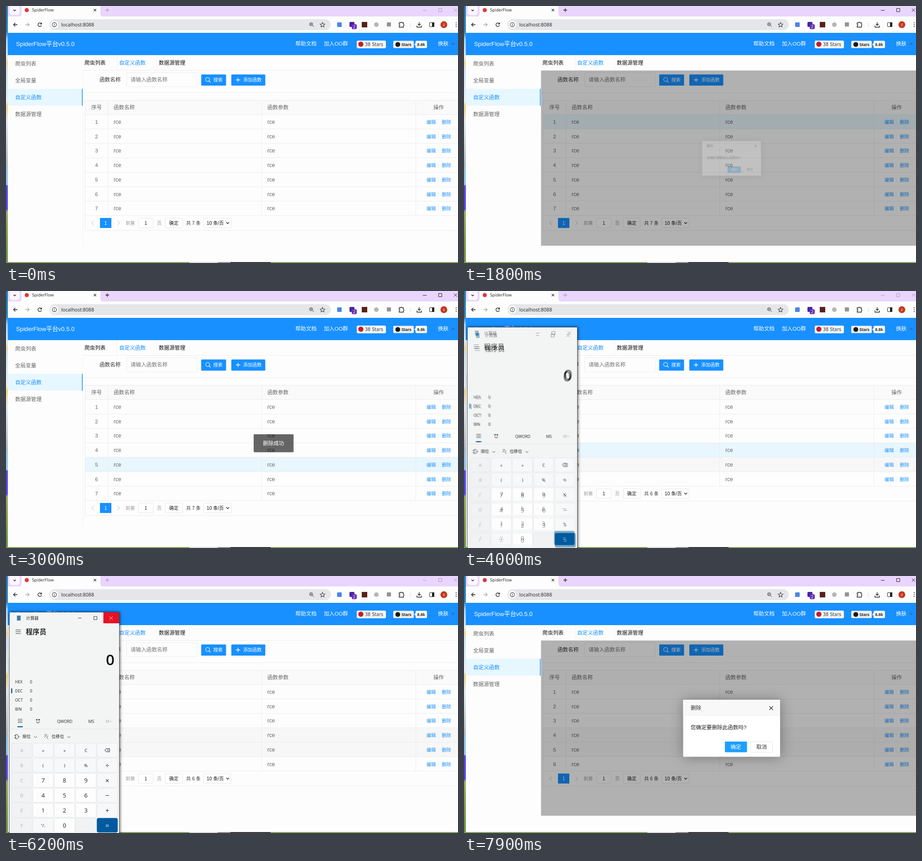
Recreate the animation shown at these times as an HTML page. Size 991 px wide and 565 px high, loop 8 s.

```html
<!DOCTYPE html>
<html lang="zh">
<head>
<meta charset="utf-8">
<title>SpiderFlow</title>
<style>
html, body { margin: 0; width: 100%; height: 100%; overflow: hidden; background: #fdfdfd; }
svg { display: block; width: 991px; height: 565px; }
text { font-family: "Liberation Sans", "Noto Sans CJK SC", "Noto Sans CJK", sans-serif; white-space: pre; }
.ui text, text.ui { font-family: "Open Sans", "Noto Sans CJK SC", "Noto Sans CJK", sans-serif; }
.mono { font-family: "DejaVu Sans", sans-serif; }

.step { animation: 8s step-end infinite; }
.focus { animation-name: focus; }
.hover { animation-name: hover; }
.seven { animation-name: seven; }
.six { animation-name: six; }
.pager { animation-name: pager; }
.shade { animation-name: shade; }
.okHover { animation-name: okHover; }
.hot { animation-name: hot; }
.dialog { transform-origin: 586.5px 335px; animation: dialog 8s infinite; filter: drop-shadow(1px 1px 14px rgba(0,0,0,.32)); }
.msg { transform-origin: 586.5px 334.5px; animation: msg 8s infinite; }
.win { transform-origin: 128px 325px; }

@keyframes focus {
  0% { color: #a99fb2; } 20% { color: #222; } 44% { color: #a99fb2; } 82.5%, 100% { color: #222; }
}
@keyframes hover {
  0% { opacity: 0; transform: translateY(63.5px); }
  8.75% { opacity: 1; transform: translateY(63.5px); }
  11.25% { opacity: 1; transform: translateY(31.75px); }
  15% { opacity: 1; transform: none; }
  33.5% { opacity: 1; transform: translateY(127px); }
  43% { opacity: 1; transform: translateY(95.25px); }
  53.5% { opacity: 0; transform: none; }
  89.9% { opacity: 1; transform: none; }
  94.5%, 100% { opacity: 0; transform: none; }
}
@keyframes seven { 0% { opacity: 1; } 42%, 100% { opacity: 0; } }
@keyframes six { 0% { opacity: 0; } 42%, 100% { opacity: 1; } }
@keyframes pager { 0% { transform: none; } 42%, 100% { transform: translateY(-31.75px); } }
@keyframes shade { 0% { opacity: 0; } 21.9% { opacity: .3; } 32.5% { opacity: 0; } 93.75%, 100% { opacity: .3; } }
@keyframes okHover { 0% { opacity: 0; } 30% { opacity: .1; } 35%, 100% { opacity: 0; } }
@keyframes dialog {
  0%, 21.9% { opacity: 0; transform: scale(.5); }
  25.65%, 32.5% { opacity: 1; transform: none; }
  35%, 93.75% { opacity: 0; transform: scale(.5); }
  97.5%, 100% { opacity: 1; transform: none; }
}
@keyframes msg {
  0%, 34.5% { opacity: 0; transform: scale(.5); }
  37%, 41% { opacity: 1; transform: none; }
  43%, 100% { opacity: 0; transform: scale(.5); }
}
@keyframes hot {
  0% { opacity: 0; fill: #e81123; color: #fff; }
  56.25% { opacity: 1; fill: #e81123; color: #fff; }
  57.8% { opacity: 1; fill: #f1707a; color: #222; }
  58.7% { opacity: 1; fill: #e81123; color: #fff; }
  64.5% { opacity: 1; fill: #f1707a; color: #222; }
  66.3% { opacity: 1; fill: #e81123; color: #fff; }
  72% { opacity: 1; fill: #f1707a; color: #222; }
  72.6% { opacity: 1; fill: #e81123; color: #fff; }
  79.8% { opacity: 1; fill: #f1707a; color: #222; }
  80.5%, 100% { opacity: 0; fill: #e81123; color: #fff; }
}
</style>
</head>
<body>
<script>
const BLUE = '#1890ff', PAGE = '#fdfdfd', LINE = '#ececec';

// y is the vertical middle of the glyphs
const text = (x, y, s, size = 11.6, fill = '#333', more = '') =>
  `<text x="${x}" y="${y + size * .37}" font-size="${size}" fill="${fill}" ${more}>${s}</text>`;
const mid = (x, y, s, size, fill, more = '') => text(x, y, s, size, fill, 'text-anchor="middle" ' + more);
const box = (x, y, w, h, fill, more = '') =>
  `<rect x="${x}" y="${y}" width="${w}" height="${h}" fill="${fill}" ${more}/>`;
const frame = (x, y, w, h, fill, stroke, r = 1.5) =>
  box(x + .5, y + .5, w - 1, h - 1, fill, `stroke="${stroke}" rx="${r}"`);
const line = (d, stroke = '#333', w = 1, more = '') =>
  `<path d="${d}" fill="none" stroke="${stroke}" stroke-width="${w}" ${more}/>`;
const dot = (x, y, r, fill, more = '') => `<circle cx="${x}" cy="${y}" r="${r}" fill="${fill}" ${more}/>`;
const cross = (x, y, r, stroke, w) => line(`M${x - r} ${y - r}l${2 * r} ${2 * r}m0 ${-2 * r}l${-2 * r} ${2 * r}`, stroke, w);
const chevron = (x, y, r, stroke, w = 1) => line(`M${x - r} ${y - r / 2}l${r} ${r}l${r} ${-r}`, stroke, w);
const group = (cls, ...parts) => `<g class="${cls}">${parts.join('')}</g>`;

function desktop() {
  const stops = [[0, '#1f78ad'], [.1, '#2a7fb8'], [.13, '#9fd0ee'], [.2, '#dcebf2'], [.22, '#f0d68c'], [.25, '#c9e3f2'],
    [.37, '#e8eef0'], [.39, '#f1cf7d'], [.45, '#dfe9ef'], [.55, '#c4ccd1'], [.62, '#a9b6bf'], [.63, '#8fc4e6'],
    [.695, '#8fc4e6'], [.7, '#5546ea'], [.79, '#5546ea'], [.8, '#93ac62'], [.9, '#7d9c45'], [1, '#6c8f3a']];
  return `<linearGradient id="edge" x2="0" y2="1">${stops.map(([o, c]) => `<stop offset="${o}" stop-color="${c}"/>`).join('')}</linearGradient>`
    + box(0, 0, 4, 565, 'url(#edge)') + box(0, 563, 991, 2, '#7f9f52')
    + box(402, 563, 62, 2, '#d5d6d2') + box(464, 563, 28, 2, '#8a8a86') + box(492, 563, 88, 2, '#2b2b2b');
}

function browser() {
  const ink = '#3a3a3a';
  return group('ui',
    box(4, 0, 987, 24, '#e9d5fd'), box(4, 23, 987, 36, PAGE),
    box(8, -4, 22, 24, '#fbf6ff', 'rx="6"'), chevron(19, 9.5, 2.6, '#222', 1.3),
    `<path d="M26 24Q34 24 34 16V0H207V16Q207 24 215 24Z" fill="${PAGE}"/>`,
    dot(45.5, 9, 4.5, '#e0363c'), text(57, 9, 'SpiderFlow', 9.3, '#222'), cross(195, 9, 2.6, '#222', 1.2),
    group('step focus',
      line('M218 9h8M222 5v8', 'currentColor', 1.3),
      line('M914 9.5h8M948.5 5.5h7v7h-7z', 'currentColor'), cross(985.5, 9, 3.5, 'currentColor', 1)),
    line('M25 41H16.500M20.500 37l-4 4 4 4', '#222', 1.3),
    line('M42.500 41H51M47 37l4 4-4 4', '#aaa', 1.3),
    line('M77.500 39A4 4 0 1 0 77.800 42.500M78 36.500V39.500H75', '#222', 1.3),
    box(95, 29, 617, 24, '#e5e6e9', 'rx="12"'), dot(106, 41, 8.5, PAGE),
    dot(106, 41, 4.6, 'none', 'stroke="#333" stroke-width="1.1"'), line('M106 40v3.500M106 38.200v1', '#333', 1.1),
    text(121, 41, 'localhost:8088', 10.7, '#222'),
    dot(669, 40, 3.3, 'none', 'stroke="#444" stroke-width="1.1"'), line('M671.500 42.500l3.500 3.500M667.300 40h3.400M669 38.300v3.400', '#444'),
    line('M694 36l1.500 3.500 3.800.300-2.900 2.500.900 3.700-3.300-2-3.300 2 .900-3.700-2.900-2.500 3.800-.300z', '#444', 1.1),
    box(726, 36, 10, 10, '#4a86e8', 'rx="1"'), box(753, 35, 11, 11, '#4527a0', 'rx="2"'),
    box(758, 40, 11, 11, '#6b2fb3', 'rx="3"'), mid(763.5, 45.5, '2', 8.5, '#fff'),
    box(780, 35, 12, 12, '#57221a'), dot(812, 41, 5, '#b5b5b5'), box(835, 36, 9, 9, '#8f9499'),
    line('M862 37h3a1.700 1.700 0 0 1 3.400 0h3v3.400a1.700 1.700 0 0 1 0 3.200v2.900h-9.400v-3a1.600 1.600 0 0 0 0-3.200z', '#222', 1.3),
    line('M886.500 37v9', '#e6cdf7'),
    line('M906 35.500v7M903 39.500l3 3 3-3M901 43v3.500h10V43', '#222', 1.3),
    frame(928, 36, 11, 10, 'none', '#222'), box(934, 36, 5, 10, '#222'),
    dot(960, 41, 7.5, '#c4381d'), mid(960, 41, 'Z', 8, '#fff'),
    [36.8, 41, 45.2].map(y => dot(987, y, 1.1, ink)).join(''));
}

function header() {
  return box(4, 59, 987, 49, BLUE)
    + text(22, 83, 'SpiderFlow平台v0.5.0', 13.2, '#fff')
    + text(634.5, 83, '帮助文档', 11.6, '#fff') + text(697, 83, '加入OO群', 11.6, '#fff')
    + box(769, 76, 64, 17, '#f6f6f6', 'rx="3"') + dot(778, 84, 5.7, '#c71d23')
    + text(787, 84, '38 Stars', 9.6, '#333', 'class="mono"')
    + box(849, 76.5, 45, 16, '#f0f0f0', 'rx="2.5"') + dot(859, 84.5, 5.3, '#1b1b1b')
    + text(867, 84.5, 'Stars', 8.8, '#222', 'font-weight="bold"')
    + box(898, 76.5, 25, 16, '#fafafa', 'rx="2.5"') + `<path d="M898 81.500l-3 3 3 3z" fill="#fafafa"/>`
    + text(901.5, 84.5, '8.8k', 8.8, '#222', 'font-weight="bold"')
    + text(947, 83, '换肤', 11.6, '#fff') + '<path d="M976 81.500h9l-4.500 4.500z" fill="#3a6ea3"/>';
}

function sidebar() {
  return box(4, 182, 164, 37, '#e6f7ff') + box(166.5, 182, 1.6, 37, BLUE)
    + ['爬虫列表', '全局变量', '自定义函数', '数据源管理']
      .map((s, i) => text(20, 126.3 + i * 37.2, s, 11.6, i == 2 ? BLUE : '#666')).join('')
    + line('M168.500 142V527', '#f3f3f3');
}

function tabs() {
  return text(172, 124.5, '爬虫列表', 11.6, '#111') + text(248, 124.5, '自定义函数', 11.6, BLUE)
    + text(335, 124.5, '数据源管理', 11.6, '#111')
    + line('M243.500 108V141M330.500 108V141', '#f1f1f1') + line('M169 141.500H991', LINE);
}

function search() {
  return text(205, 161.5, '函数名称') + frame(264, 146, 156, 32, 'none', '#eee')
    + text(273, 161.5, '请输入函数名称', 11.6, '#757575')
    + box(428, 150.5, 54.5, 24.5, BLUE, 'rx="1.5"') + dot(442, 161.5, 4.3, 'none', 'stroke="#fff" stroke-width="1.1"')
    + line('M445 164.500l3.500 3.500', '#fff', 1.2) + text(454.5, 162.5, '搜索', 10.2, '#fff')
    + box(494, 150.5, 74.5, 24.5, BLUE, 'rx="1.5"') + line('M504 162.500h9.500M508.700 157.800v9.500', '#fff', 1.3)
    + text(520, 162.5, '添加函数', 10.1, '#fff') + line('M169 190.500H991', LINE);
}

const PITCH = 31.75, TOP = 238.5;
const columns = (y, h) => line([173.5, 223.5, 560.5, 898.5].map(x => `M${x} ${y}v${h}`).join(''), LINE);

function row(i) {
  const y = TOP + i * PITCH, c = y + 16;
  return group(i == 6 ? 'step seven' : '',
    columns(y, PITCH), line(`M173 ${y + PITCH}H991`, LINE),
    mid(198.5, c, i + 1, 11.6, '#666'), text(236, c, 'rce', 11.9, '#666'), text(573, c, 'rce', 11.9, '#666'),
    text(922, c + .7, '编辑', 10.2, BLUE), text(955.5, c + .7, '删除', 10.2, BLUE), line(`M947.500 ${c - 5}v11`, '#eee'));
}

function table() {
  return box(173, 207, 818, 31, '#fafafa') + line('M173 207.500H991M173 238.500H991', LINE) + columns(207, 31.5)
    + mid(198.5, 223, '序号', 11.6, '#666') + text(236, 223, '函数名称', 11.6, '#666')
    + text(573, 223, '函数参数', 11.6, '#666') + mid(948.5, 223, '操作', 11.6, '#666')
    + box(174, TOP + 3 * PITCH, 817, 2 * PITCH, '#f7f7f7', 'class="step six"')
    + box(174, TOP, 817, PITCH, '#e8f6fd', 'class="step hover"')
    + [...Array(7).keys()].map(row).join('');
}

function pager() {
  const y = 477;
  return group('step pager',
    line('M173.500 461V493.500H991', LINE),
    line(`M192.500 ${y - 4.5}l-4.500 4.500 4.500 4.500`, '#bbb'), line(`M244.500 ${y - 4.5}l4.500 4.500-4.500 4.500`, '#bbb'),
    box(206, 466, 25, 22, BLUE, 'rx="1"'), mid(218.5, y, '1', 10.2, '#fff'),
    text(262, y, '到第', 10.2, '#999'), frame(290, 466, 33, 22, '#fff', '#e8e8e8'), mid(306.5, y, '1', 10.2, '#222'),
    text(331, y, '页', 10.2, '#999'), frame(349, 466, 38, 22, '#fff', '#e8e8e8'), mid(368, y, '确定', 10.2, '#222'),
    text(395, y, '共 7 条', 10.2, '#333', 'class="step seven"'), text(395, y, '共 6 条', 10.2, '#333', 'class="step six"'),
    frame(433, 466, 61, 22, '#fff', '#e8e8e8'), text(440, y, '10 条/页', 10.2, '#111'), chevron(486, y, 3, '#222', 1.3));
}

function dialog() {
  return box(169, 142, 822, 385, '#000', 'class="step shade"')
    + group('dialog',
      box(480.5, 272, 212.5, 125.5, '#fff', 'rx="1.5"'), box(480.5, 272, 212.5, 34, '#f8f8f8', 'rx="1.5"'),
      line('M480.500 306.500h212.500', '#eee'),
      text(497, 289.5, '删除'), cross(673.5, 290.5, 4, '#333', 1.4), text(497, 333, '您确定要删除此函数吗?', 11.6, '#222'),
      box(572, 364, 48.5, 23.5, '#1e9fff', 'rx="1.5"'), mid(596, 375.7, '确定', 11.6, '#fff'),
      box(572, 364, 48.5, 23.5, '#fff', 'rx="1.5" class="step okHover"'),
      frame(628, 364, 49, 24, '#fff', '#e6e6e6'), mid(652.5, 375.7, '取消', 11.6, '#333'))
    + group('msg', box(543, 315, 87.5, 39.5, 'rgba(0,0,0,.6)', 'rx="2"'), mid(586.5, 334.7, '删除成功', 11.6, '#fff'));
}

function key(label, i) {
  const col = i % 5, r = i / 5 | 0, x = 34.5 + col * 46.9, y = 383 + r * 33;
  const equal = i == 29, digit = /^\d$/.test(label), off = !col || label == '.';
  const fill = equal ? '#005a9e' : off ? '#f1f2f3' : digit ? '#fdfdfd' : '#f7f8f9';
  const ink = equal ? '#fff' : off ? '#a8a8a8' : '#222';
  const face = box(x - 22.5, y - 15.5, 45, 31, fill, `rx="3" stroke="${equal ? '#005a9e' : '#e3e5e7'}" stroke-width=".8"`);
  if (label == 'del') return face + line(`M${x - 5.5} ${y}l3-3.500h7.500v7h-7.500z`, ink) + cross(x + 1.2, y, 1.5, ink, .9);
  const big = digit ? 13 : /[÷×−+=]/.test(label) ? 15 : 9.5;
  return face + mid(x, y + .5, label, big, ink);
}

function calculator() {
  const ink = '#222', keys = 'A « » C del B ( ) % ÷ C 7 8 9 × D 4 5 6 − E 1 2 3 + F ⁺/₋ 0 . ='.split(' ');
  const dots = [27.5, 31, 34.5].map(x => [315, 318.5, 322].map(y => dot(x, y, 1, ink)).join('')).join('');
  return `<g id="calc" class="ui">` + [
    box(8, 80, 240, 520, '#f3f4f4'),
    box(24, 87, 8, 11, '#3c7ca8', 'rx="1"'), text(44, 92.5, '计算器', 9.2, ink),
    line('M158 92.500h7.500M192.500 89h7v7h-7z', ink, .9), cross(230.5, 92.5, 3.7, ink, .9),
    line('M21 118.500h11.500M21 122.500h11.500M21 126.500h11.500', ink, .9),
    text(43.5, 122, '程序员', 15, ink, 'font-weight="bold"'),
    text(219, 184, '0', 33, '#111', 'font-weight="600"'),
    ['HEX', 'DEC', 'OCT', 'BIN'].map((s, i) => text(20, 232.5 + 20 * i, s, 8.5, ink) + text(52.5, 232.5 + 20 * i, '0', 8.8, ink)).join(''),
    box(11.3, 247, 2.4, 11, '#005a9e', 'rx="1"'),
    dots, box(25, 330.3, 12, 2.2, '#005a9e', 'rx="1"'),
    dot(67.5, 316, 1.6, ink), dot(72.5, 316, 1.6, ink), dot(67.5, 321, 1, ink), dot(72.5, 321, 1, ink), dot(70, 323, 1, ink),
    text(112, 319.5, 'QWORD', 8.9, ink), text(180.5, 319.5, 'MS', 8.9, ink), text(218.5, 319.5, 'M', 8.9, '#aaa'), chevron(230, 319.5, 2.5, '#aaa', .9),
    line('M8 336.500H248', '#e4e7e8'),
    line('M18 351h3M18 355.500h3M21 348.500h2.500q4 1.500 4 4.700t-4 4.700h-2.500zM27.500 353.200h2.500', ink, .9),
    text(36, 353, '按位', 9.1, ink), chevron(64.5, 354, 3, ink, .9),
    line('M84 348l3.500 3.500-3.500 3.500M92.500 351l-3.500 3.500 3.500 3.500M87 348l3 2', ink, .9),
    text(100, 353, '位移位', 9.1, ink), chevron(138, 354, 3, ink, .9),
    keys.map(key).join('')
  ].join('') + '</g>';
}

// bottom window first: opening and closing spans in percent of the loop
const windows = [[44, 47, 80.5, 83.5], [48, 52, 72.5, 75.5], [51.5, 54, 66.3, 68.5], [51.5, 54, 58.5, 61.5]];
const style = document.createElement('style');
style.textContent = windows.map(([a, b, c, d], i) => `
@keyframes win${i} {
  0%, ${a}% { opacity: 0; transform: scale(.955); }
  ${b}%, ${c}% { opacity: 1; transform: none; }
  ${d}%, 100% { opacity: 0; transform: scale(.94); }
}
.win${i} { animation: win${i} 8s linear infinite; }`).join('');
document.head.append(style);

const shadow = box(7.5, 79.5, 241, 520, '#444', 'style="filter:drop-shadow(1px 0 3px rgba(0,0,0,.75))"');
const stack = windows.map((_, i) => group(`win win${i}`, i ? '' : shadow, '<use href="#calc"/>')).join('');
const hot = `<g class="step hot"><rect x="213.500" y="80" width="34.500" height="24"/>${cross(230.5, 92.5, 3.7, 'currentColor', .9)}</g>`;

document.body.innerHTML = `<svg viewBox="0 0 991 565"><defs>${calculator()}</defs>`
  + box(0, 0, 991, 565, PAGE) + desktop() + browser() + header() + sidebar() + tabs() + search()
  + table() + pager() + dialog() + stack + hot + '</svg>';
</script>
</body>
</html>
```
